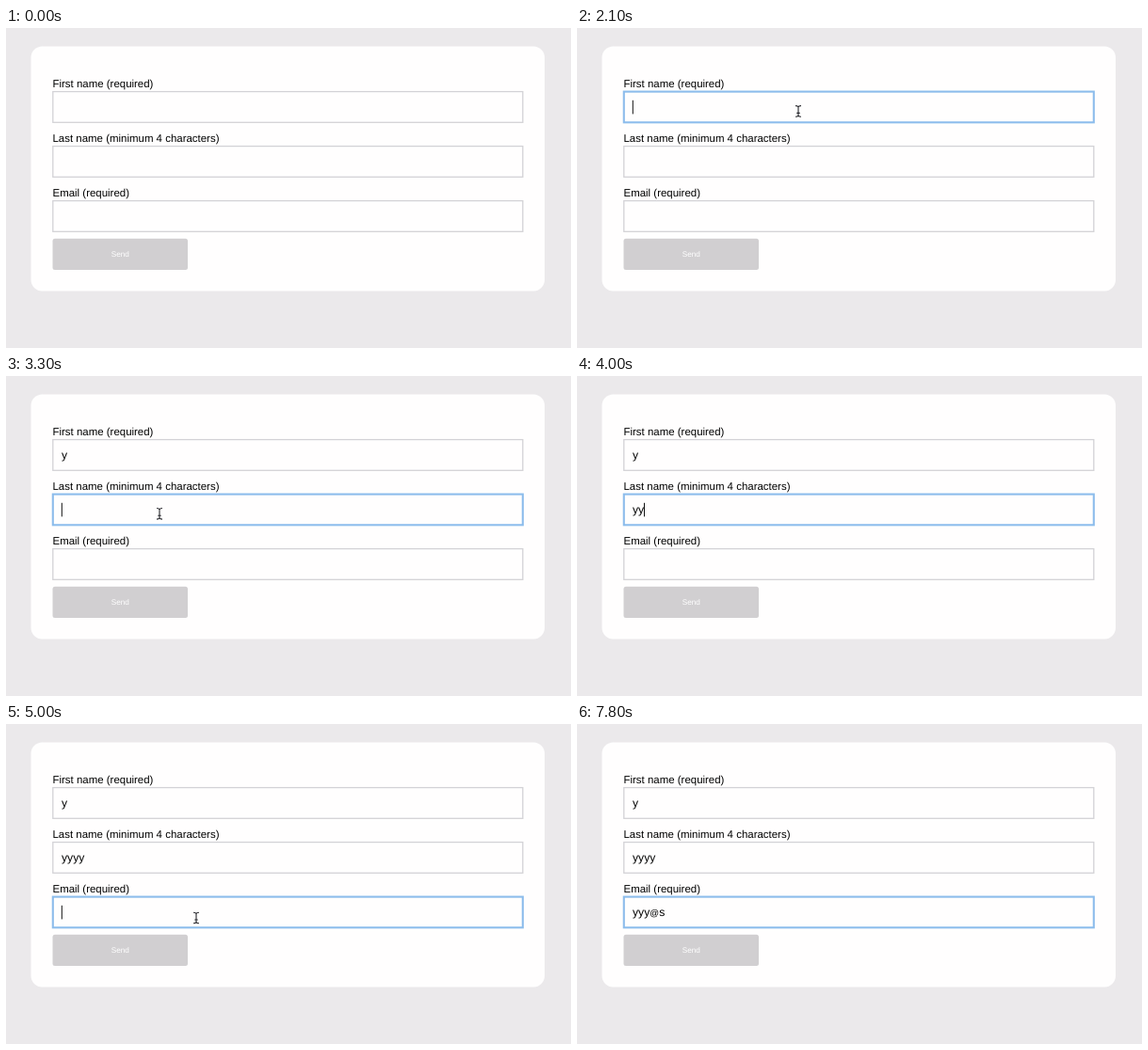
Write an HTML page that moves like this. It is 600 by 340 pixels and loops after 8 s.

```html
<!DOCTYPE html>
<html lang="en">
<head>
<meta charset="utf-8">
<title>Form being filled in</title>
<style>
  html, body { margin: 0; width: 100%; height: 100%; overflow: hidden; background: #ebe9eb; }
  svg { display: block; width: 600px; height: 340px; }
  text { font: 11.46px "Liberation Sans", sans-serif; text-rendering: geometricPrecision; }
  .value { font-size: 12.2px; }
  .at { font-size: 9.7px; }
  .send { font-size: 8.2px; fill: #fff; text-anchor: middle; }
  .box { fill: #fffefe; stroke: #d3d2d6; stroke-width: 1.3; }
  .box.focused { stroke: #8dbdec; stroke-width: 2.1; }
</style>
</head>
<body>
<svg viewBox="0 0 600 340">
  <rect width="600" height="340" fill="#ebe9eb"/>
  <rect x="26.5" y="19.5" width="545.5" height="260" rx="12" fill="#fffefe"/>
  <g id="fields"></g>
  <rect x="49.5" y="223.7" width="143.5" height="33.2" rx="2.5" fill="#d1cfd1"/>
  <text class="send" x="121.3" y="243.2">Send</text>
  <rect id="caret" width="1" height="14.6" fill="#111"/>
  <g id="pointer" fill="none">
    <circle id="ring" r="10.8" fill="#fffefe" stroke="#0d0d14" stroke-width="2.4"/>
    <path d="M-3 -5.8Q-.3 -5.8 0 -4.4Q.3 -5.8 3 -5.8M0 -4.6V4.6M-3 5.8Q-.3 5.8 0 4.4Q.3 5.8 3 5.8M-1.7 2H1.7"
          stroke="#26262b" stroke-width="1.1"/>
  </g>
</svg>
<script>
const LOOP = 8000, FIELD_PITCH = 58, TEXT_X = 59;
const byId = id => document.getElementById(id);
const labels = ["First name (required)", "Last name (minimum 4 characters)", "Email (required)"];

byId("fields").innerHTML = labels.map((label, i) => `
  <g transform="translate(0 ${i * FIELD_PITCH})">
    <text x="49.5" y="63">${label}</text>
    <rect class="box" x="49.8" y="67.6" width="499" height="32.7"/>
    <text class="value" x="${TEXT_X}" y="88.3"></text>
  </g>`).join("");
const boxes = [...document.querySelectorAll(".box")];
const values = [...document.querySelectorAll(".value")];

const initial = { focus: -1, text: ["", "", ""], caret: false, pointer: null, ring: false };
const events = [];
const at = (time, change) => events.push({ time, change });
const focus = (time, field) => at(time, { focus: field, caret: true, ring: false });
const type = (time, field, text, caret = true) => at(time, { field, text, caret });
const blink = (time, caret) => at(time, { caret });
const hidePointer = time => at(time, { pointer: null });
// The pointer is redrawn ten times a second.
const move = (start, ...points) =>
  points.forEach((pointer, i) => at(start + i * 100, { pointer }));

move(500, [524, 166], [445, 137], [340, 111], [267, 97], [232, 91], [225, 90], [235, 89.3]);
move(1800, [235, 88.4]);
focus(2100, 0);
type(2400, 0, "y");
hidePointer(2500);
move(2700, [229, 95], [201, 121], [173, 142], [163, 146.3]);
blink(2900, false);
at(3200, { ring: true, caret: true });
focus(3300, 1);
type(3600, 1, "y");
hidePointer(3600);
blink(3800, false);
type(4000, 1, "yy");
type(4200, 1, "yyy");
type(4300, 1, "yyyy");
move(4400, [175, 158], [215, 199], [239, 222], [214, 212], [202, 206]);
focus(5000, 2);
type(5300, 2, "y");
hidePointer(5400);
type(5600, 2, "yy");
blink(5700, false);
type(6000, 2, "yyy");
blink(6100, false);
blink(6700, true);
blink(7300, false);
type(7500, 2, "yyy@");
type(7800, 2, "yyy@s", false);

function stateAt(time) {
  const state = { ...initial, text: [...initial.text] };
  for (const { time: start, change } of events) {
    if (start > time) continue;
    const { field, text, ...rest } = change;
    Object.assign(state, rest);
    if (text) state.text[field] = text;
  }
  return state;
}

function show(element, visible) {
  element.style.display = visible ? "" : "none";
}

function draw() {
  const { focus, text, caret, pointer, ring } = stateAt(performance.now() % LOOP);
  boxes.forEach((box, i) => box.classList.toggle("focused", i === focus));
  values.forEach((value, i) => {
    if (value.textContent !== text[i])
      value.innerHTML = text[i].replace("@", '<tspan class="at">@</tspan>');
  });

  show(byId("caret"), caret);
  if (caret) {
    const width = text[focus] ? values[focus].getComputedTextLength() : 0;
    byId("caret").setAttribute("x", TEXT_X + width - 0.2);
    byId("caret").setAttribute("y", 76.8 + focus * FIELD_PITCH);
  }

  show(byId("pointer"), pointer);
  show(byId("ring"), ring);
  if (pointer) byId("pointer").setAttribute("transform", `translate(${pointer})`);
  requestAnimationFrame(draw);
}
draw();
</script>
</body>
</html>
```
